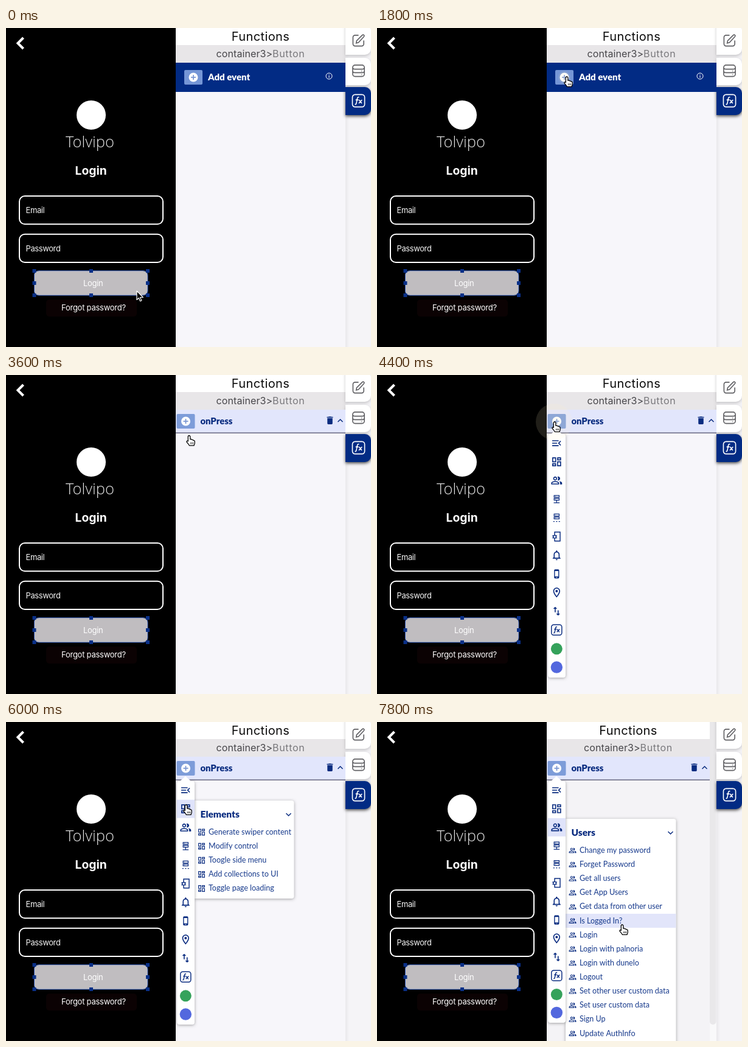
An HTML page with a canvas for the animation above (8 s loop, 600 px wide and 524 px high).

```html
<!DOCTYPE html>
<html lang="en">
<head>
<meta charset="utf-8">
<title>Event builder</title>
<style>
html, body { margin: 0; width: 100%; height: 100%; overflow: hidden; background: #000; }
canvas { display: block; width: 600px; height: 524px; }
</style>
</head>
<body>
<canvas id="stage"></canvas>
<script>
const LOOP = 8000, STEP = 200;
const NAVY = '#022b84', LILAC = '#e2e6fc', INK = '#0a2c80';
const UI = 'Inter, sans-serif', ROUND = 'Lato, sans-serif';
const canvas = document.getElementById('stage');
const ctx = canvas.getContext('2d');
const ratio = window.devicePixelRatio || 1;
canvas.width = 600 * ratio;
canvas.height = 524 * ratio;

// Filled glyphs on a 24-unit grid
const glyphs = {
  menu: 'M3 18h13v-2H3v2zm0-5h10v-2H3v2zm0-7v2h13V6H3zm18 9.59L17.42 12 21 8.41 19.59 7l-5 5 5 5L21 15.59z',
  grid: 'M19 5v2h-4V5h4M9 5v6H5V5h4m10 8v6h-4v-6h4M9 17v2H5v-2h4M21 3h-8v6h8V3zM11 3H3v10h8V3zm10 8h-8v10h8V11zm-10 4H3v6h8v-6z',
  people: 'M16.67 13.13C18.04 14.06 19 15.32 19 17v3h4v-3c0-2.18-3.57-3.47-6.33-3.87zM15 12c2.21 0 4-1.79 4-4s-1.79-4-4-4c-.47 0-.91.1-1.33.24C14.5 5.27 15 6.58 15 8s-.5 2.73-1.33 3.76c.42.14.86.24 1.33.24zM9 12c2.21 0 4-1.79 4-4s-1.79-4-4-4-4 1.79-4 4 1.79 4 4 4zm0-6c1.1 0 2 .9 2 2s-.9 2-2 2-2-.9-2-2 .9-2 2-2zm0 7c-2.67 0-8 1.34-8 4v3h16v-3c0-2.66-5.33-4-8-4zm6 5H3v-.99c.2-.72 3.3-2.01 6-2.01s5.8 1.29 6 2v1z',
  bell: 'M12 22c1.1 0 2-.9 2-2h-4c0 1.1.9 2 2 2zm6-6v-5c0-3.07-1.63-5.64-4.5-6.32V4c0-.83-.67-1.5-1.5-1.5s-1.5.67-1.5 1.5v.68C7.64 5.36 6 7.92 6 11v5l-2 2v1h16v-1l-2-2zm-2 1H8v-6c0-2.48 1.51-4.5 4-4.5s4 2.02 4 4.5v6z',
  phone: 'M15.500 1h-7A2.500 2.500 0 0 0 6 3.500v17A2.500 2.500 0 0 0 8.500 23h7a2.500 2.500 0 0 0 2.500-2.500v-17A2.500 2.500 0 0 0 15.500 1zM8 5h8v13H8zM10 20h4v1h-4z',
  pin: 'M12 2C8.13 2 5 5.13 5 9c0 5.25 7 13 7 13s7-7.75 7-13c0-3.87-3.13-7-7-7zM7 9c0-2.76 2.24-5 5-5s5 2.24 5 5c0 2.88-2.88 7.19-5 9.88C9.92 16.21 7 11.85 7 9zM12 6.5a2.5 2.5 0 1 0 0 5 2.5 2.5 0 0 0 0-5z',
  swap: 'M9 3L5 6.99h3V14h2V6.99h3L9 3zm7 14.01V10h-2v7.01h-3L15 21l4-3.99h-3z',
  trash: 'M6 19c0 1.1.9 2 2 2h8c1.1 0 2-.9 2-2V7H6v12zM19 4h-3.5l-1-1h-5l-1 1H5v2h14V4z'
};
// Outlined glyphs on the same grid
const lines = {
  node: 'M6 3h12v4.5H6zM6 10h12v4.5H6zM12 14.5V20.500M5 20.500h14M8.5 5.2h1M8.5 12.2h1',
  nodes: 'M6 3h12v4.5H6zM6 10h12v4.5H6zM4 20.500h3M10.500 20.500h3M17 20.500h3M8.5 5.2h1M8.5 12.2h1',
  device: 'M8 8V3h11v18H8v-4M8 9.5a3 3 0 1 0 .01 0M8 8v1.5M8 15.5V17M3.5 10l2 1M3.5 15l2-1M12.5 10l-2 1M12.5 15l-2-1',
  edit: 'M12 3H6a3.5 3.5 0 0 0-3.5 3.5V18A3.5 3.5 0 0 0 6 21.5h11.5A3.5 3.5 0 0 0 21 18v-6M8 16.5l.8-4L18.500 2.800a1.800 1.800 0 0 1 2.700 2.700L12 15.500z',
  data: 'M6 2.500h12a4 4 0 0 1 4 4c0 1.800-1.800 3-4 3H6c-2.200 0-4-1.200-4-3a4 4 0 0 1 4-4zM2 6.500v6c0 1.800 1.800 3 4 3h12c2.200 0 4-1.200 4-3v-6M2 12.500V18a4 4 0 0 0 4 4h12a4 4 0 0 0 4-4v-5.500M17 12.600h1M17 18.800h1',
  fx: 'M6 1.500h12A4.500 4.500 0 0 1 22.500 6v12a4.500 4.500 0 0 1-4.500 4.500H6A4.500 4.500 0 0 1 1.500 18V6A4.500 4.500 0 0 1 6 1.500zM13 6c-2-.8-2.800.4-3.100 2L8.300 16c-.3 1.600-1 2.500-2.500 2M7 10.500h5M13 10.500l4.500 6M18 10.500l-5.500 6',
  touch: 'M10 14V6.500a1.800 1.800 0 0 1 3.600 0V12l5 1.500-.8 7H11L6 15l1.500-1.500zM7 8a5 5 0 1 1 9.500 0'
};
const hand = new Path2D('M0 0c1.200 0 1.800.9 1.800 2v4.200l.6-.1c1.200-.5 2 .2 2.300.9 1.200-.4 2 .1 2.300 1 1.200-.3 2.200.3 2.200 1.800v2.600c0 1.600-1 2.400-1.200 4H.3c-.6-2-2.600-3.400-4-5.600-1.200-1.600.6-2.800 2-1.400V2c0-1.100.6-2 1.700-2z');
const knuckles = new Path2D('M2.600 11v3M4.600 11v3M6.600 11v3');
const arrow = new Path2D('M0 0v14.500l3.300-3.100 2.300 5.300 2.300-1-2.300-5.200h4.800z');

const elements = ['Generate swiper content', 'Modify control', 'Toogle side menu',
  'Add collections to UI', 'Toggle page loading'];
const users = ['Change my password', 'Forget Password', 'Get all users', 'Get App Users',
  'Get data from other user', 'Is Logged In?', 'Login', 'Login with palnoria',
  'Login with dunelo', 'Logout', 'Set other user custom data', 'Set user custom data',
  'Sign Up', 'Update AuthInfo'];
const tools = ['menu', 'grid', 'people', 'node', 'nodes', 'device', 'bell', 'phone', 'pin', 'swap', 'fx'];
const smallTools = ['node', 'nodes', 'phone'];

// Pointer stops: time, x, y
const stops = [[0, 215, 432], [200, 215, 432], [1600, 312, 80], [2000, 312, 80], [2600, 310, 122],
  [3200, 310, 122], [4000, 292, 77], [4600, 292, 77], [5200, 296, 136], [6000, 296, 136],
  [6400, 296, 168], [6800, 296, 168], [7200, 340, 212], [7600, 400, 383], [7800, 403, 333]];
const clicks = [[1800, 308, 81], [3000, 308, 123], [4200, 291, 77]];

function pointer(t) {
  const i = Math.max(1, stops.findIndex(s => s[0] >= t));
  const [t0, x0, y0] = stops[i - 1], [t1, x1, y1] = stops[i];
  const p = (t - t0) / (t1 - t0), e = p * p * (3 - 2 * p);
  return [x0 + (x1 - x0) * e, y0 + (y1 - y0) * e];
}

function rect(x, y, w, h, fill, r = 0) {
  ctx.beginPath();
  ctx.roundRect(x, y, w, h, r);
  ctx.fillStyle = fill;
  ctx.fill();
}

function frame(x, y, w, h, color, width, r = 0) {
  ctx.beginPath();
  ctx.roundRect(x, y, w, h, r);
  ctx.strokeStyle = color;
  ctx.lineWidth = width;
  ctx.stroke();
}

function circle(x, y, r, fill) {
  ctx.beginPath();
  ctx.arc(x, y, r, 0, 7);
  ctx.fillStyle = fill;
  ctx.fill();
}

function poly(points, color, width) {
  ctx.beginPath();
  points.forEach(p => ctx.lineTo(...p));
  if (width) {
    ctx.strokeStyle = color;
    ctx.lineWidth = width;
    ctx.stroke();
  } else {
    ctx.fillStyle = color;
    ctx.fill();
  }
}

function text(s, x, y, font, color, space = 0) {
  ctx.font = font;
  ctx.letterSpacing = space + 'px';
  ctx.fillStyle = color;
  ctx.fillText(s, x, y);
}

function withShadow(draw, blur = 5, dy = 1, color = 'rgba(0,0,0,.35)') {
  ctx.save();
  ctx.shadowColor = color;
  ctx.shadowBlur = blur * ratio;
  ctx.shadowOffsetY = dy * ratio;
  draw();
  ctx.restore();
}

function icon(name, x, y, size, color = INK, weight = 1.8) {
  const k = size / 24;
  ctx.save();
  ctx.translate(x - size / 2, y - size / 2);
  ctx.scale(k, k);
  if (glyphs[name]) {
    ctx.fillStyle = color;
    ctx.fill(new Path2D(glyphs[name]), 'evenodd');
  } else {
    ctx.strokeStyle = color;
    ctx.lineWidth = weight;
    ctx.stroke(new Path2D(lines[name]));
  }
  ctx.restore();
}

function chevron(x, y, dy, color = INK) {
  poly([[x - 4, y - dy], [x, y + dy], [x + 4, y - dy]], color, 1.5);
}

function plusTile(x, y, color) {
  rect(x, y, 30, 24, color, 2);
  circle(x + 15, y + 12, 7.5, '#fff');
  poly([[x + 11, y + 12], [x + 19, y + 12]], '#7895d2', 1.7);
  poly([[x + 15, y + 8], [x + 15, y + 16]], '#7895d2', 1.7);
}

function drawPhone() {
  rect(0, 0, 279, 524, '#000');
  poly([[28.500, 16], [19.500, 25], [28.500, 34]], '#fff', 4);
  circle(140, 143, 24, '#fff');
  text('Tolvipo', 98, 196, '300 25.5px "Open Sans", sans-serif', '#e4e4e4');
  text('Login', 113.500, 241, `bold 19.3px ${UI}`, '#fff');
  const font = `13px ${UI}`;
  [['Email', 276], ['Password', 338.700]].forEach(([label, y]) => {
    frame(22, y, 236, 46.300, '#fff', 2, 9);
    text(label, 32.500, y + 28, font, '#f4f4f4', -0.4);
  });
  rect(66, 446, 149, 28, '#0b0203', 5);
  text('Forgot password?', 91, 464, font, '#fff', -0.25);
  rect(46, 399, 187, 40, '#c0bdc0', 8);
  frame(46.500, 398.700, 186.500, 40.500, '#2f5cc0', 0.9, 7);
  text('Login', 127, 423.500, font, '#fff', -0.3);
  for (const x of [46.500, 140, 233])
    for (const y of [399, 419, 439])
      if (x !== 140 || y !== 419) rect(x - 3, y - 3, 6, 6, '#0a3088');
}

function drawTabs() {
  rect(558, 0, 42, 524, '#f5f4f7');
  const edge = ctx.createLinearGradient(558, 0, 564, 0);
  edge.addColorStop(0, '#e9e8eb');
  edge.addColorStop(1, '#f5f4f7');
  rect(558, 0, 6, 524, edge);
  const tabs = [['edit', -6, 50, 20.500], ['data', 49, 45, 70], ['fx', 97, 46, 119.500]];
  tabs.forEach(([name, y, h, cy]) => {
    const active = name === 'fx';
    withShadow(() => rect(558, y, 42, h, active ? NAVY : '#fff', [0, 10, 10, 0]), 5, 2,
      active ? 'rgba(0,0,0,.7)' : 'rgba(0,0,0,.2)');
    icon(name, 579.500, cy, 23, active ? '#fff' : '#606064', 1.7);
  });
}

function drawHeader(shift) {
  const w = shift ? 268 : 279;
  rect(279, 0, 279, 524, shift ? '#f4f3f6' : '#f7f6fa');
  rect(279, 0, w, 28, '#fff');
  rect(279, 28, w, 29, '#e8e6e8');
  text('Functions', 370.700 - shift, 20.500, `20px ${UI}`, '#0c0c0c', 0.4);
  const font = `16px ${UI}`;
  text('container3>', 345.500 - shift, 47.500, font, '#47464a', 0.1);
  text('Button', 438 - shift, 47.500, font, '#79787c', 0.7);
  if (shift) {
    rect(547, 0, 11, 524, '#f9f9fa');
    rect(547, -8, 10.500, 505, '#e9e8ea', 5);
  }
}

function drawAddEvent(open) {
  rect(279, 57, 279, 48, NAVY);
  plusTile(293, 69, '#7596d6');
  text('Add event', 332, 86, `900 15px ${ROUND}`, '#fff');
  frame(526, 74, 10, 10, '#fff', 1, 5);
  rect(530.500, 78, 1, 4, '#fff');
  rect(530.500, 76, 1, 1, '#fff');
  if (!open) return;
  withShadow(() => rect(293, 103, 97, 30, '#e2e6fb', 4));
  rect(293, 103, 30, 30, '#d0d8f2', [4, 0, 0, 4]);
  poly([[309, 93], [321, 103.500], [297, 103.500]], '#eef0fd');
  icon('touch', 308.500, 117, 19, '#2a52a8', 1.6);
  text('onPress', 332, 122.500, `900 13px ${ROUND}`, INK);
}

function drawPressRow(shift) {
  const dx = shift * 2;
  rect(279, 57, 279 - dx, 38, LILAC);
  rect(279, 94.500, 279 - dx, 1.200, '#4c4c68');
  plusTile(280.500, 64, '#7d9cd9');
  text('onPress', 319.500, 81, `900 14.8px ${ROUND}`, INK);
  icon('trash', 532.500 - dx, 74.500, 17);
  chevron(549.500 - dx, 75, -2);
}

function drawStrip(hot, shift) {
  const gap = shift ? 30.45 : 30.67;
  const y = i => 112 + gap * i;
  withShadow(() => rect(281, 97, 29, shift ? 397 : 400, '#fff', 4));
  poly([[295, 89], [305, 98], [285, 98]], '#fff');
  if (hot >= 0) rect(281, y(hot) - 15, 29, 30, '#dfe3fa');
  tools.forEach((name, i) =>
    icon(name, 295.300, y(i), smallTools.includes(name) ? 16.500 : 19.500, INK, 1.8));
  circle(295.300, y(11) + 0.5, 9.5, '#35a25b');
  circle(295.300, y(12), 9.7, '#5368de');
}

function drawPanel(title, rows, glyph, y, w, h, spot) {
  withShadow(() => rect(310, y, w, h, '#fff', [0, 4, 4, 0]));
  text(title, 319.500, y + 28, `900 15.5px ${ROUND}`, INK);
  chevron(310 + w - 9, y + 23, 2);
  rows.forEach((label, i) => {
    const cy = y + 52 + 23.12 * i;
    if (spot && spot[0] > 312 && Math.abs(spot[1] - cy) < 11.560) rect(310, cy - 11.500, w, 23, '#e2e5fa');
    icon(glyph, 321.500, cy, glyph === 'grid' ? 14.500 : 13);
    text(label, 333, cy + 4, `12.5px ${ROUND}`, '#173a8c');
  });
}

function drawPointer(t) {
  const [x, y] = pointer(t);
  const isArrow = t < 1600;
  ctx.save();
  ctx.translate(x, y);
  ctx.lineJoin = 'round';
  ctx.lineWidth = isArrow ? 1.2 : 1.3;
  ctx.fillStyle = isArrow ? '#000' : '#fff';
  ctx.strokeStyle = isArrow ? '#fff' : '#000';
  ctx.fill(isArrow ? arrow : hand);
  ctx.stroke(isArrow ? arrow : hand);
  if (!isArrow) {
    ctx.lineWidth = 0.8;
    ctx.stroke(knuckles);
  }
  ctx.restore();
}

function draw(t) {
  ctx.setTransform(ratio, 0, 0, ratio, 0, 0);
  const shift = t >= 6400 ? 5.5 : 0;
  drawHeader(shift);
  drawTabs();
  drawPhone();
  if (t < 3200) {
    drawAddEvent(t >= 2000);
  } else {
    drawPressRow(shift);
    if (t >= 4400) {
      if (t >= 6400) drawPanel('Users', users, 'people', 159, 181.500, 380, pointer(t));
      else if (t >= 5200) drawPanel('Elements', elements, 'grid', 129, 163.500, 161);
      drawStrip(t >= 6400 ? 2 : t >= 5200 ? 1 : -1, shift);
    }
  }
  clicks.forEach(([at, x, y]) => {
    const age = t - at;
    if (age >= 0 && age < 2 * STEP) circle(x, y, 10 + age / 10, 'rgba(255,238,190,.13)');
  });
  drawPointer(t);
}

const start = performance.now();
function tick() {
  const t = (performance.now() - start) % LOOP;
  draw(Math.floor(t / STEP) * STEP);
  requestAnimationFrame(tick);
}
tick();
</script>
</body>
</html>
```
